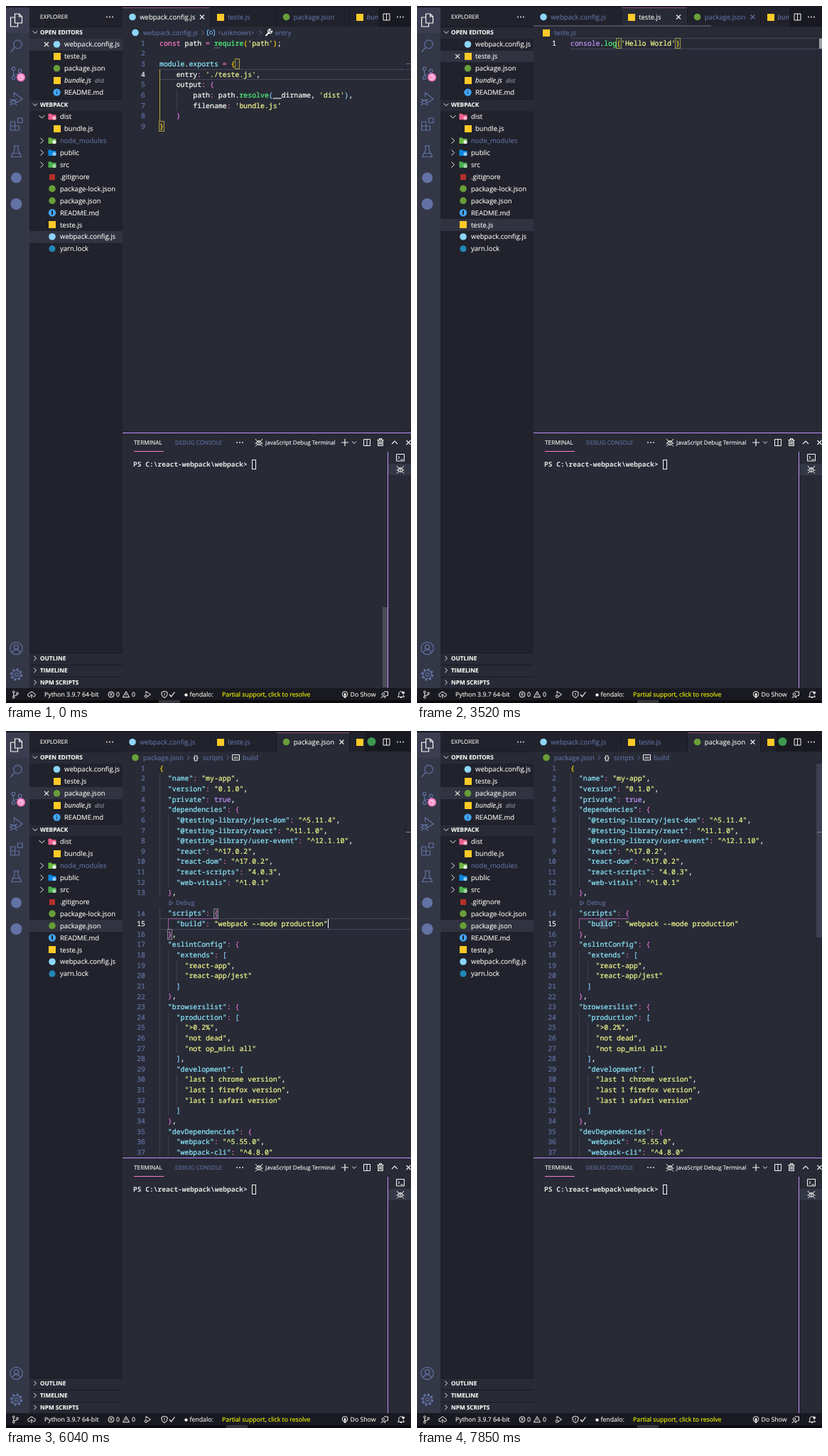
Write an HTML page that moves like this. It is 570 px wide and 982 px high and loops after 8000 ms.

```html
<!DOCTYPE html>
<html lang="en">
<head>
<meta charset="utf-8">
<title>Editor walkthrough</title>
<style>
html, body { margin: 0; width: 100%; height: 100%; overflow: hidden; background: #282a36; }
svg { display: block; width: 570px; height: 982px; font-family: "Open Sans", "Noto Sans", sans-serif; text-rendering: geometricPrecision; }
rect { shape-rendering: crispEdges; }
text, tspan { white-space: pre; fill: currentColor; stroke: currentColor; stroke-width: .12px; }
.mono, .mono tspan { font-family: "Noto Sans Mono", "DejaVu Sans Mono", monospace; stroke-width: .22px; }
.prompt { font-weight: 600; stroke: none; }
.key { color: #8be9fd; } .str { color: #f1fa8c; } .op { color: #ff79c6; }
.fn { color: #50fa7b; } .val { color: #bd93f9; }
.b0 { color: #ffd700; } .b1 { color: #da70d6; } .b2 { color: #87cefa; }
.plain .br { color: #f8f8f2; }
</style>
</head>
<body>
<svg id="stage" viewBox="0 0 570 982"></svg>
<script>
const LOOP = 8000, END = LOOP;
const WHITE = '#f8f8f2', DIM = '#6272a4', EDITOR = '#282a36', SIDE = '#21222c', DARK = '#191a21', SELECT = '#44475a', PURPLE = '#bd93f9';
const CW = 5.92, LH = 14.62, X0 = 216, Y0 = 45;
const OPEN_JS = 2190, OPEN_JSON = 4140;

const esc = s => s.replace(/&/g, '&amp;').replace(/</g, '&lt;');
const rect = (x, y, w, h, fill, more = '') => `<rect x="${x}" y="${y}" width="${w}" height="${h}" fill="${fill}" ${more}/>`;
const disc = (x, y, r, fill) => `<circle cx="${x}" cy="${y}" r="${r}" fill="${fill}"/>`;
const ring = (x, y, r, color, w = 1, more = '') => `<circle cx="${x}" cy="${y}" r="${r}" fill="none" stroke="${color}" stroke-width="${w}" ${more}/>`;
const line = (d, color = WHITE, w = 1) => `<path d="${d}" fill="none" stroke="${color}" stroke-width="${w}"/>`;
const move = (x, y, s) => `<g transform="translate(${x} ${y})">${s}</g>`;
const text = (x, y, s, color = WHITE, size = 9.5, more = '') =>
  `<text x="${x}" y="${(y + size * .36).toFixed(2)}" color="${color}" font-size="${size}" ${more}>${esc(s)}</text>`;
// Ranges are pairs of start and end times in ms.
const when = (ranges, s) => `<g data-on="${ranges.join()}">${s}</g>`;

const right = (x, y, c = WHITE, k = 1) => line(`M${x - 2 * k},${y - 4 * k}l${4 * k},${4 * k}l${-4 * k},${4 * k}`, c);
const down = (x, y, k = 1) => line(`M${x - 4 * k},${y - 2 * k}l${4 * k},${4 * k}l${4 * k},${-4 * k}`);
const cross = (x, y, c = WHITE, r = 3) => line(`M${x - r},${y - r}l${2 * r},${2 * r}m0,${-2 * r}l${-2 * r},${2 * r}`, c, 1.1);
const dots = (x, y) => [-4, 0, 4].map(d => disc(x + d, y, .9, WHITE)).join('');
const splitIcon = (x, y) => line(`M${x - 4.5},${y - 4.5}h9v9h-9zM${x},${y - 4.5}v9`);
const bug = (x, y) => move(x, y, ring(0, .5, 3, WHITE) +
  line('M-3,-1h6M-5,-5l2.5,3M5,-5l-2.5,3M-5.5,1h2.5M5.5,1h-2.5M-5,5.5l2.5,-2.5M5,5.5l-2.5,-2.5M0,-1v4'));

const fileIcon = (kind, x, y) => ({
  js: rect(x - 5, y - 4.8, 10, 10, '#ffca28'),
  pack: disc(x, y, 4.8, '#8dd6f9'),
  json: disc(x, y, 4.8, '#689f38'),
  md: disc(x, y, 5.2, '#42a5f5') + rect(x - .6, y - 1, 1.3, 3.6, SIDE) + rect(x - .6, y - 3, 1.3, 1.3, SIDE),
  git: rect(x - 4, y - 4, 8, 8, '#b5302a'),
  yarn: disc(x, y, 4.6, '#2188b6')
})[kind];
const folder = (x, y, fill, badge) => move(x, y,
  `<path d="M-5.5,-4.3h4l1.5,1.5h5.5v7h-11z" fill="${fill}"/>` + disc(3, 1.8, 2.6, badge));

function activityBar() {
  const L = (d, c = DIM) => line(d, c, 1.2);
  const icons = [
    [20, L('M-2,-9h6l4,4v9h-10zM4,-9v4h4M-2,-4h-6v13h10v-5', WHITE)],
    [56, ring(2, -2, 5.8, DIM, 1.2) + L('M-2,2L-8,9')],
    [95, ring(-4, -6.5, 2.3, DIM, 1.2) + ring(-4, 6, 2.3, DIM, 1.2) + ring(5, -3.5, 2.3, DIM, 1.2) +
      L('M-4,-4v8M5,-1c0,4 -9,1 -9,5') + disc(6.5, 5.5, 6, '#ff79c6') + ring(6.5, 5.5, 3.3, WHITE) + line('M6.5,3.5v2h2')],
    [131, L('M-3,-3v-6L8.5,0L0,5.5') + ring(-4, 4, 3.2, DIM, 1.2) + L('M-9,0l2.5,2M1,0l-2.5,2M-10,4.5h3M-1,4.5h3M-9,9l2.5,-2M1,9l-2.5,-2M-7,3h6')],
    [167, L('M-8,-4h6v6h6v6h-12zM-8,2h6v6M2,-9h6.5v6.5h-6.5z')],
    [205, L('M-4,-8h8M-2.5,-8v6l-4.5,9.5h14l-4.5,-9.5v-6M-4.5,2.5h9')],
    [242, disc(0, 0, 7.5, DIM)],
    [279, disc(0, 0, 8, DIM)],
    [905, ring(0, 0, 8.7, DIM, 1.2) + ring(0, -2, 3.2, DIM, 1.2) + L('M-5.5,6.5a5.6,5.6 0 0 1 11,0')],
    [942, ring(0, 0, 7.4, DIM, 2.6, 'stroke-dasharray="3 2.81"') + ring(0, 0, 5.8, DIM, 1.1) + ring(0, 0, 2.4, DIM, 1.2)]
  ];
  return rect(0, 2, 33, 959, '#343746') + rect(0, 2, 33, 36, PURPLE, 'opacity=".06"') +
    icons.map(([y, s]) => move(14.5, y, s)).join('');
}

function sidebar() {
  const openY = i => 54 + 16.9 * i, treeY = i => 156 + 16.9 * i;
  const head = (y, s, open) => rect(33, y - 8, 131, 17, EDITOR) + rect(33, y - 8, 131, 1, DARK) +
    (open ? down(41, y, .8) : right(41, y, WHITE, .8)) + text(48, y, s, WHITE, 8.25, 'font-weight="700"');
  const mark = y => rect(33, y - 8.4, 131, 16.9, '#313341');
  const openMark = i => mark(openY(i)) + cross(57, openY(i));

  let s = rect(33, 2, 131, 959, SIDE) + text(48, 15.5, 'EXPLORER', WHITE, 8.1) + dots(146, 15.5);
  s += head(37, 'OPEN EDITORS', 1) + head(139, 'WEBPACK', 1);
  s += when([0, OPEN_JS], openMark(0) + mark(treeY(10)));
  s += when([OPEN_JS, OPEN_JSON], openMark(1)) + when([OPEN_JSON, END], openMark(2));
  s += when([OPEN_JS, 4350], mark(treeY(9))) + when([4350, END], mark(treeY(7)));

  [['pack', 'webpack.config.js'], ['js', 'teste.js'], ['json', 'package.json'], ['js', 'bundle.js'], ['md', 'README.md']]
    .forEach(([kind, name], i) => {
      const italic = i === 3;
      s += fileIcon(kind, 71.5, openY(i)) + text(82, openY(i), name, WHITE, 9.5, italic ? 'font-style="italic"' : '');
      if (italic) s += text(125, openY(i), 'dist', '#9a9ca3', 8.3, 'font-style="italic"');
    });

  [['dist', '#ec5f8d', '#f8bbd0'], 0, ['node_modules', '#6bb544', '#e8f5e9'], ['public', '#0b87e0', '#90caf9'], ['src', '#4caf50', '#a5d6a7']]
    .forEach((f, i) => {
      if (!f) return;
      const y = treeY(i);
      s += (i ? right(50.5, y) : down(50.5, y)) + folder(65, y, f[1], f[2]) + text(76, y, f[0], i === 2 ? DIM : WHITE);
    });
  s += fileIcon('js', 71.5, treeY(1)) + text(82, treeY(1), 'bundle.js');
  [['git', '.gitignore'], ['json', 'package-lock.json'], ['json', 'package.json'], ['md', 'README.md'], ['js', 'teste.js'],
    ['pack', 'webpack.config.js'], ['yarn', 'yarn.lock']]
    .forEach(([kind, name], i) => s += fileIcon(kind, 65, treeY(i + 5)) + text(76, treeY(i + 5), name));
  return s + head(919, 'OUTLINE') + head(936, 'TIMELINE') + head(953, 'NPM SCRIPTS');
}

function tabs() {
  const tab = (x, w, kind, name, from, to) =>
    rect(x, 2, w, 27, SIDE) + rect(x + w - 1, 2, 1, 27, DARK) +
    when([from, to], rect(x, 2, w - 1, 27, EDITOR) + rect(x, 2, w - 1, 1, '#94527e')) +
    fileIcon(kind, x + 14, 15.5) +
    when([0, from, to, END], text(x + 24.2, 15.5, name, DIM)) +
    when([from, to], text(x + 24.2, 15.5, name));
  const actions = x => rect(x, 2, 570 - x, 27, DARK) + splitIcon(535.5, 15.5) + dots(555, 15.5);
  return rect(164, 2, 406, 27, DARK) +
    tab(164, 124, 'pack', 'webpack.config.js', 0, OPEN_JS) +
    tab(288, 93, 'js', 'teste.js', OPEN_JS, OPEN_JSON) +
    tab(380.5, 103.5, 'json', 'package.json', OPEN_JSON, END) +
    rect(484, 2, 60, 27, SIDE) + fileIcon('js', 498, 15.5) + text(507.5, 15.5, 'bundle.js', DIM, 9.5, 'font-style="italic"') +
    when([0, OPEN_JS], cross(276, 15.5)) +
    when([770, OPEN_JS], cross(368, 15.5, DIM)) + when([OPEN_JS, OPEN_JSON], cross(368, 15.5)) +
    when([3260, OPEN_JSON], cross(472.5, 15.5, DIM)) + when([OPEN_JSON, END], cross(472.5, 15.5)) +
    when([0, OPEN_JSON], actions(524)) + when([OPEN_JSON, END], actions(505)) +
    when([4480, END], disc(514.5, 15, 6, '#3d9a50')) +
    when([700, OPEN_JSON], rect(164, 27, 250, 2, '#4b4d58')) +
    when([OPEN_JSON, 4700], rect(164, 27, 223, 2, '#4b4d58'));
}

function breadcrumbs() {
  const y = 37.5, crumb = (x, s) => text(x, y, s, DIM, 9.4), sep = x => right(x, y, DIM, .8);
  const wrench = move(370, y, line('M-4.5,4.5L1,-1', WHITE, 2) + line('M4.5,-2.5a3,3 0 1 1 -2.3,-2.3l-1.4,2l1.5,1.5z', WHITE, 1.2));
  return when([0, OPEN_JS], fileIcon('pack', 182, y) + crumb(193, 'webpack.config.js') + sep(277) +
      line('M286,34h-2.5v7h2.5M291,34h2.5v7h-2.5', '#75beff') + ring(288.5, 37.5, 2, '#75beff') +
      crumb(298, '<unknown>') + sep(358) + wrench + crumb(378.5, 'entry')) +
    when([OPEN_JS, OPEN_JSON], fileIcon('js', 182, y) + crumb(193, 'teste.js')) +
    when([OPEN_JSON, END], fileIcon('json', 182, y) + crumb(193, 'package.json')) +
    when([5340, END], sep(256.5) + text(263.5, y, '{}', WHITE, 9.5, 'font-weight="600"') + crumb(277, 'scripts') + sep(312) +
      line('M318.5,33.5h10v7.5h-10z') + text(320, y, 'abc', WHITE, 4.6) + crumb(333, 'build'));
}

const colX = c => +(X0 + c * CW).toFixed(2), rowY = r => +(Y0 + r * LH).toFixed(2);
const box = (r, c, color = '#8b8d96') => rect(colX(c) - .3, rowY(r) + .5, CW + .4, LH - 1, '#fff', `fill-opacity=".05" stroke="${color}" stroke-width=".9"`);
const fillRun = (r, a, b) => rect(colX(a), rowY(r), (b - a) * CW, LH, SELECT);
const caret = (r, c) => rect(colX(c) - .3, rowY(r) + .5, 1.4, LH - 1, WHITE);
const currentLine = r => [r, r + 1].map(i => rect(X0, Math.round(rowY(i)), 354, 1, SELECT)).join('');

const TOKEN = /("[^"]*"(?=:)|\bmodule\b|\bexports\b)|("[^"]*"|'[^']*')|(\bconst\b|[:=])|(\brequire\b|\bresolve\b|\blog\b)|(\btrue\b|\bconsole\b)|([{(\[])|([})\]])/g;
const KINDS = ['key', 'str', 'op', 'fn', 'val'];

// A line that starts with "#" is an unnumbered code lens.
function code(lines, active, indent) {
  let depth = 0, n = 0, s = '';
  lines.forEach((src, r) => {
    const y = rowY(r) + LH / 2;
    if (src[0] === '#') {
      s += line(`M230,${y - 3}l5,3l-5,3z`, DIM) + text(239, y, src.slice(1), DIM, 8.6);
      return;
    }
    n++;
    const lead = src.search(/\S|$/);
    for (let c = 0; c < lead; c += indent) s += rect(colX(c), rowY(r), 1, LH, '#fff', 'opacity=".1"');
    s += text(196, y, String(n), n === active ? WHITE : DIM, 9.87, 'class="mono" text-anchor="end"');
    const marked = esc(src).replace(TOKEN, (m, ...g) => {
      const k = g.slice(0, 7).findIndex(Boolean);
      if (k < 5) return `<tspan class="${KINDS[k]}">${m}</tspan>`;
      const level = k === 5 ? depth++ : --depth;
      return `<tspan class="br b${level % 3}">${m}</tspan>`;
    });
    s += `<text class="mono" x="${X0}" y="${(y + 3.5).toFixed(2)}" font-size="9.87" color="${WHITE}">${marked}</text>`;
  });
  return s;
}

const CONFIG = `const path = require('path');

module.exports = {
    entry: './teste.js',
    output: {
        path: path.resolve(__dirname, 'dist'),
        filename: 'bundle.js'
    }
}`.split('\n');

const PACKAGE = `{
  "name": "my-app",
  "version": "0.1.0",
  "private": true,
  "dependencies": {
    "@testing-library/jest-dom": "^5.11.4",
    "@testing-library/react": "^11.1.0",
    "@testing-library/user-event": "^12.1.10",
    "react": "^17.0.2",
    "react-dom": "^17.0.2",
    "react-scripts": "4.0.3",
    "web-vitals": "^1.0.1"
  },
#Debug
  "scripts": {
    "build": "webpack --mode production"
  },
  "eslintConfig": {
    "extends": [
      "react-app",
      "react-app/jest"
    ]
  },
  "browserslist": {
    "production": [
      ">0.2%",
      "not dead",
      "not op_mini all"
    ],
    "development": [
      "last 1 chrome version",
      "last 1 firefox version",
      "last 1 safari version"
    ]
  },
  "devDependencies": {
    "webpack": "^5.55.0",
    "webpack-cli": "^4.8.0"`.split('\n');

function editor() {
  const config = currentLine(3) + box(2, 18, '#b9a53a') + box(8, 0, '#b9a53a') + code(CONFIG, 4, 4) +
    rect(X0, rowY(3), 1, LH * 5, '#b9a53a') + [0, 3, 6].map(d => disc(294 + d, 59, .7, '#a9abb2')).join('') +
    rect(563, 81, 7, 1, '#6b6d78');

  const parens = c => box(0, 11, c) + box(0, 25, c);
  const script = currentLine(0) + when([2380, 3520], parens('#8b8d96') + caret(0, 26)) + when([3520, OPEN_JSON], parens('#a3a04a')) +
    when([2380, OPEN_JSON], rect(566, 46, 4, 14, '#a0a1a6')) + code(["console.log('Hello World')"], 1, 2);

  let quotes = '';
  PACKAGE.forEach((src, r) => [...src].forEach((ch, c) => { if (ch === '"') quotes += fillRun(r, c, c + 1); }));
  const ruler = [[52, 70], [135, 13], [155, 17], [173, 36], [250, 8], [297, 19], [323, 26]]
    .map(([y, h]) => rect(565, y, 5, h, '#f0ae68')).join('');
  const picks = [[6830, 6980, 39, 40], [6980, 7050, 28, 40], [7050, 7250, 16, 40], [7250, 7450, 11, 40], [7520, END, 7, 9]];
  const carets = [[4610, 5540, 40], [5830, 6240, 40], [6240, 6370, 12], [6370, 6830, 40], [6830, 6980, 39],
    [6980, 7050, 28], [7050, 7250, 16], [7250, 7450, 11], [7450, 7520, 9], [7520, 7850, 7]];
  const json = when([OPEN_JSON, 6830], currentLine(15)) +
    when([6980, END], rect(562, 46, 8, 245, SELECT, 'opacity=".75"')) + rect(563, 142, 7, 1, '#7f8c86') +
    when([6830, 6980], quotes + ruler) +
    picks.map(([a, b, from, to]) => when([a, b], fillRun(15, from, to))).join('') +
    when([4610, 7450], box(14, 13) + box(16, 2)) +
    code(PACKAGE, 15, 2) +
    when([5340, END], line('M228.5,279V264.5H298', '#a35a9f')) +
    carets.map(([a, b, c]) => when([a, b], caret(15, c))).join('');

  return rect(164, 29, 406, 572, EDITOR) + rect(562, 45, 1, 556, '#22242e') +
    when([0, OPEN_JS], config) + when([OPEN_JS, OPEN_JSON], script) + when([OPEN_JSON, END], json);
}

function panel() {
  const y = 615;
  return rect(164, 601, 406, 360, EDITOR) + rect(164, 601, 406, 1, PURPLE) +
    text(180, y, 'TERMINAL', WHITE, 8.25) + rect(180, 627, 42, 1, '#ff79c6') + text(238, y, 'DEBUG CONSOLE', DIM, 8.1) +
    dots(329, y) + bug(356, y) + text(365, y, 'JavaScript Debug Terminal', WHITE, 8.1) +
    line(`M472,${y}h10M477,${y - 5}v10`, WHITE, 1.2) + down(490, y, .7) + splitIcon(508, y) +
    line('M522.5,611.5h9M525.5,611v-1.5h3v1.5M523.8,612v7.5h6.4v-7.5M526,613v5M528,613v5', WHITE, 1.2) +
    line('M543,617l4,-4l4,4', WHITE, 1.1) + cross(566.5, y) +
    text(179, 646, 'PS C:\\react-webpack\\webpack> ', '#e4e4e2', 9.57, 'class="mono prompt"') +
    rect(346.5, 639.5, 5.2, 12.5, 'none', `stroke="${WHITE}" stroke-width="1"`) +
    when([0, 440, OPEN_JS, 3260], rect(530, 847, 7, 113, '#4b4d56')) +
    rect(538, 645, 32, 16, '#343746') + rect(537, 628, 1, 333, PURPLE) +
    line('M549.5,631.5h11v9.5h-11zM551.5,634l2.5,2.2l-2.5,2.2M555.5,639h3.5') + bug(555, 653);
}

function statusBar() {
  const y = 970, say = (x, s, c = WHITE) => text(x, y, s, c, 8.75);
  return rect(0, 961, 570, 17, DARK) + rect(0, 978, 570, 4, '#0c0c10') +
    when([0, 1710], rect(215, 978, 30, 4, '#34353b')) + when([1710, END], rect(310, 978, 30, 4, '#34353b')) +
    move(13, y, ring(-2.2, -3.5, 1.4, WHITE) + ring(-2.2, 3.8, 1.4, WHITE) + ring(3, -1.5, 1.4, WHITE) + line('M-2.2,-2v4.3M3,0c0,2 -5,.5 -5,2.5')) +
    move(36, y, line('M-2,3h-1a2.3,2.3 0 0 1 0,-4.6a3.2,3.2 0 0 1 6,0a2.3,2.3 0 0 1 0,4.6h-1M0,5v-5M-1.8,1.6l1.8,-1.8l1.8,1.8')) +
    say(54, 'Python 3.9.7 64-bit') +
    ring(148, y, 4, WHITE) + cross(148, y, WHITE, 1.6) + say(155, '0') +
    line('M169,965.8l4.5,8h-9zM169,968.8v2.7') + say(177, '0') +
    move(199, y, line('M-2,-1v-3.5L4.5,0L0,3') + ring(-2, 2.4, 1.8, WHITE)) +
    move(223, y, line('M0,-4.6l4,1.4v3q0,3 -4,5q-4,-2 -4,-5v-3zM0,-2v2.5M0,1.6v1')) + line('M230,970l2.5,3l5,-6.5', WHITE, 1.2) +
    disc(253.5, 970.6, 2.2, WHITE) + say(258.5, 'fendalo:') + say(304, 'Partial support, click to resolve', '#ffff00') +
    move(477, y, disc(0, -.5, 1.5, WHITE) + ring(0, -.5, 3.8, WHITE) + line('M-.8,0v4.5h1.6v-4.5')) + say(484.5, 'Do Show') +
    move(533, y, line('M-1,-4h5.5v5.5h-2l-2,2v-2') + ring(-2.2, -.5, 1.7, WHITE) + line('M-5,5a2.9,2.9 0 0 1 5.6,0')) +
    move(556, y, line('M2,-3.6a3.3,3.3 0 0 0 -5.2,2.6v2.4l-1.2,2h8.8l-1.2,-2v-1M-1,4.5h2') + disc(3.2, -2.4, 1.8, WHITE));
}

const stage = document.getElementById('stage');
stage.innerHTML = rect(0, 0, 570, 982, DARK) + activityBar() + sidebar() + editor() + breadcrumbs() + tabs() + panel() + statusBar();

const timed = [...stage.querySelectorAll('[data-on]')].map(g => [g, g.dataset.on.split(',').map(Number)]);
const inside = (t, r) => r.some((a, i) => i % 2 === 0 && t >= a && t < r[i + 1]);

function tick() {
  const t = performance.now() % LOOP;
  for (const [g, r] of timed) g.style.display = inside(t, r) ? '' : 'none';
  // Bracket colours arrive a moment after a file opens.
  stage.classList.toggle('plain', inside(t, [OPEN_JS, 3520, OPEN_JSON, 5340]));
  requestAnimationFrame(tick);
}
tick();
</script>
</body>
</html>
```
